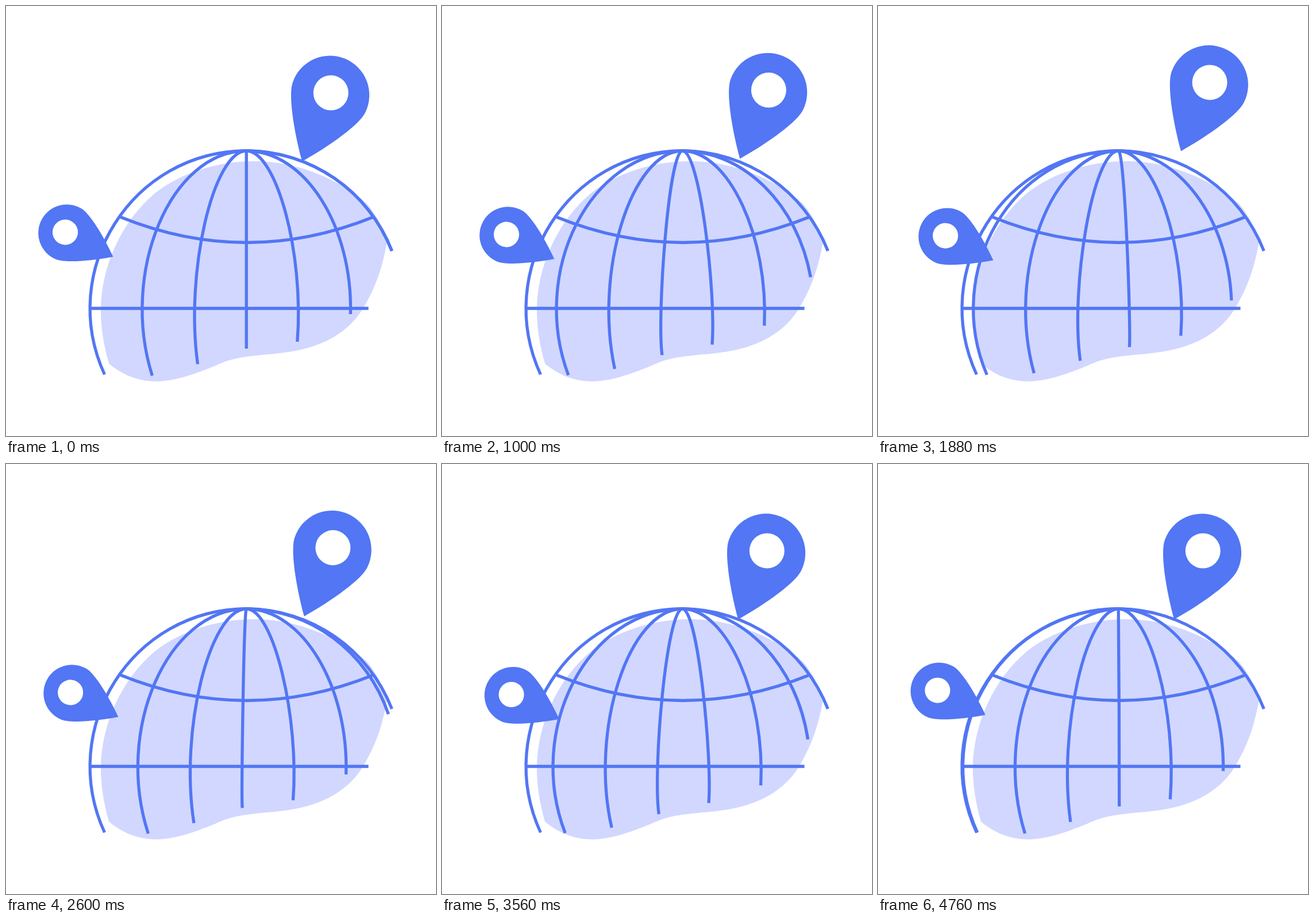
An HTML page with a canvas that plays this animation: 748 px wide and 748 px high, repeating every 4.8 s.

```html
<!DOCTYPE html>
<html lang="en">
<head>
<meta charset="utf-8">
<title>Globe with pins</title>
<style>
html, body { margin: 0; width: 100%; height: 100%; overflow: hidden; background: #fff; }
canvas { display: block; }
</style>
</head>
<body>
<canvas id="stage" width="748" height="748"></canvas>
<script>
const ctx = document.getElementById('stage').getContext('2d');
const BLUE = '#5276f4', PALE = '#d1d7ff';
const LOOP = 4800, STEP = 40, SPIN = 2400;
const CENTER = 418.2, EQUATOR = 526, RADIUS = 274, SPACING = 90.6;

const BLOB = new Path2D(`M179 622 C170 590 165 560 165 530 C165 455 200 375 260 325
  C305 290 370 269 435 270 C510 271 580 302 628 344 C645 364 656 388 663 409
  C655 455 643 490 620 528 C590 575 540 596 483 603 C445 608 405 608 375 621
  C340 636 300 652 262 653 C230 653 203 642 179 622Z`);

// Pin standing on its tip at the origin.
const PIN = new Path2D(`M0 0 C-35 -45 -68 -99 -68.4 -121.6
  A68.5 68.5 0 1 1 68.4 -121.6 C68 -99 35 -45 0 0Z
  M30.5 -129.5 A30.5 30.5 0 1 0 -30.5 -129.5 A30.5 30.5 0 1 0 30.5 -129.5Z`);

// Cubic for an elliptical arc from the pole down to endY; the handles
// shorten towards the middle, where the arc becomes a straight line.
function meridian(endY, index) {
  const column = index - 3;
  const halfWidth = column * SPACING;
  const angle = Math.asin((endY - EQUATOR) / RADIUS);
  const reach = 4 / 3 * Math.tan((Math.PI / 2 + angle) / 4);
  const handle = reach * (1 - 0.1 ** Math.abs(column));
  const endX = CENTER + halfWidth * Math.cos(angle);
  return [
    CENTER + halfWidth * handle, EQUATOR - RADIUS,
    endX + halfWidth * reach * Math.sin(angle), endY - RADIUS * handle * Math.cos(angle),
    endX, endY
  ];
}

// Where the meridians stop, west to east.
const MERIDIANS = [641, 643, 623, 596, 584, 536, 426].map(meridian);

const mix = (a, b, p) => a.map((v, k) => v + (b[k] - v) * p);

function strokeMeridian(curve) {
  ctx.beginPath();
  ctx.moveTo(CENTER, EQUATOR - RADIUS);
  ctx.bezierCurveTo(...curve);
  ctx.stroke();
}

function globe(phase) {
  ctx.fillStyle = PALE;
  ctx.fill(BLOB);
  ctx.strokeStyle = BLUE;
  ctx.lineWidth = 5.3;
  ctx.beginPath();
  ctx.moveTo(147, EQUATOR);
  ctx.lineTo(630.5, EQUATOR);
  ctx.moveTo(199.5, 367.3);
  ctx.quadraticCurveTo(418.8, 455.7, 638.5, 367.3);
  ctx.stroke();

  strokeMeridian(MERIDIANS[0]);
  strokeMeridian(MERIDIANS.at(-1));
  // The others drift into the place of their western neighbour.
  MERIDIANS.slice(1).forEach((curve, i) => strokeMeridian(mix(curve, MERIDIANS[i], phase)));
}

// Eased swing 0 -> 1 -> 0 once per period.
function swing(t, period) {
  const x = 1 - Math.abs(2 * (t / period % 1) - 1);
  return x * x * (3 - 2 * x);
}

function pin(x, y, angle, scale) {
  ctx.save();
  ctx.translate(x, y);
  ctx.rotate(angle);
  ctx.scale(scale, scale);
  ctx.fillStyle = BLUE;
  ctx.fill(PIN, 'evenodd');
  ctx.restore();
}

function draw(now) {
  const t = Math.floor((now % LOOP) / STEP) * STEP;
  ctx.fillStyle = '#fff';
  ctx.fillRect(0, 0, 748, 748);
  globe((t % SPIN) / SPIN);
  const big = swing(t, 1195), small = swing(t, 800);
  pin(515.1 + 12.6 * big, 270.5 - 19.2 * big, 0.397, 1);
  pin(186.3 + 18.2 * small, 436.2 + 7.8 * small, -1.097, 0.7228);
}

const start = performance.now();
function tick() {
  draw(performance.now() - start);
  requestAnimationFrame(tick);
}
tick();
</script>
</body>
</html>
```
